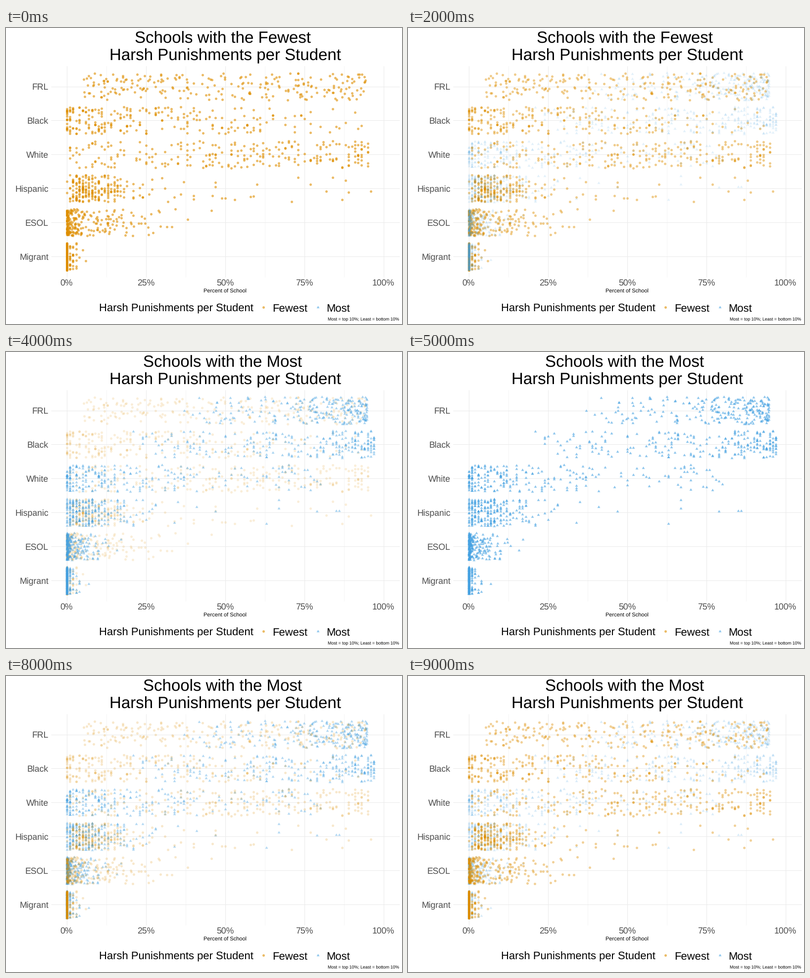
A matplotlib script that plays this animation: 800 px wide and 600 px high, repeating every 10 s.

```python
import numpy as np
import matplotlib.pyplot as plt
from matplotlib.animation import FuncAnimation
from matplotlib.path import Path

W, H, DPI = 800, 600, 100
PX = 72 / DPI                      # points per pixel
ORANGE, BLUE = "#DE8E00", "#46A2E2"
GREY, GRID = "#4D4D4D", "#EBEBEB"
ALPHA = 0.6
X0, PCT = 122.5, 6.4               # pixel of 0 %, pixels per percent
ROWS = ["FRL", "Black", "White", "Hispanic", "ESOL", "Migrant"]
ROW_Y = {name: 118.5 + 68.95 * i for i, name in enumerate(ROWS)}
JITTER = 27.4
SCHOOLS = 240

plt.rcParams["font.family"] = "Liberation Sans"
plt.rcParams["text.hinting"] = "none"
rng = np.random.default_rng(12)


def spread(row, low, high, a, b, tail=0.0, whole=True):
    """One dot per school: beta-shaped shares, a few of them spread evenly."""
    v = low + (high - low) * rng.beta(a, b, SCHOOLS)
    far = rng.random(SCHOOLS) < tail
    v[far] = rng.uniform(low, 97, far.sum())
    if whole:
        v = np.round(v)
    y = ROW_Y[row] + rng.uniform(-JITTER, JITTER, SCHOOLS)
    return np.column_stack([X0 + PCT * v, y])


fewest = np.vstack([
    spread("FRL", 5, 94.7, 1, 0.9, whole=False),
    spread("Black", 0, 98, 0.6, 1.7),
    spread("White", 0, 95, 1.15, 0.85),
    spread("Hispanic", 0, 70, 1.6, 11, tail=0.12),
    spread("ESOL", 0, 75, 0.4, 4, whole=False),
    spread("Migrant", 0, 16, 0.15, 6),
])
most = np.vstack([
    spread("FRL", 35, 94.8, 1.6, 0.6, whole=False),
    spread("Black", 20, 97, 1.2, 0.65),
    spread("White", 0, 88, 0.45, 1.4),
    spread("Hispanic", 0, 100, 0.9, 11, tail=0.03),
    spread("ESOL", 0, 35, 0.35, 5, whole=False),
    spread("Migrant", 0, 16, 0.15, 6),
])

fig = plt.figure(figsize=(W / DPI, H / DPI), dpi=DPI, facecolor="white")
ax = fig.add_axes([0, 0, 1, 1])
ax.set(xlim=(0, W), ylim=(H, 0))
ax.axis("off")


def line(x, y, width):
    ax.plot(x, y, color=GRID, lw=width * PX, solid_capstyle="butt", zorder=1)


def label(x, y, s, size, ha="left", color="black"):
    return ax.text(x, y, s, fontsize=size * PX, ha=ha, va="baseline", color=color)


for k in range(9):
    x = X0 + 80 * k
    line([x, x], [77.2, 504.6], 0.55 if k % 2 else 1.07)
    if k % 2 == 0:
        label(x, 522.3, f"{k * 12.5:.0f}%", 17.6, "center", GREY)
for name, y in ROW_Y.items():
    line([90.5, 794.5], [y, y], 1.07)
    label(86, y + 6.4, name, 17.6, "right", GREY)

title = label(437.9, 30.3, "", 33, "center")
label(442.5, 65.4, "Harsh Punishments per Student", 33, "center")
label(442.5, 537, "Percent of School", 11, "center")
label(188, 574.3, "Harsh Punishments per Student", 22)
label(538.6, 574.3, "Fewest", 22)
label(647.5, 574.3, "Most", 22)
label(794.5, 593.2, "Most = top 10%; Least = bottom 10%", 8.8, "right")

TRIANGLE = Path([(0, 1.55), (1.347, -0.775), (-1.347, -0.775), (0, 1.55)], closed=True)


def dots(xy, marker, size, color):
    return ax.scatter(*np.transpose(xy), s=(size * PX) ** 2, marker=marker,
                      color=color, linewidths=0, alpha=ALPHA, zorder=2)


few = dots(fewest, "o", 5, ORANGE)
top = dots(most, TRIANGLE, 6.7, BLUE)
dots([(519.6, 565.6)], "o", 5, ORANGE)
dots([(629.7, 565.6)], TRIANGLE, 6.7, BLUE)


def share(i):
    """Part of the fade that belongs to the 'most' group."""
    if i < 5:
        return max(0, i - 1) / 4
    return 1 - max(0, i - 7) / 3


def draw(i):
    p = share(i)
    few.set_alpha(ALPHA * (1 - p))
    top.set_alpha(ALPHA * p)
    # the group fading in lies on top
    few.set_zorder(4 if i > 5 else 2)
    top.set_zorder(3)
    title.set_text("Schools with the " + ("Fewest" if i < 4 else "Most"))
    return few, top, title


anim = FuncAnimation(fig, draw, frames=10, interval=1000, repeat=True, repeat_delay=0)
plt.show()
```
